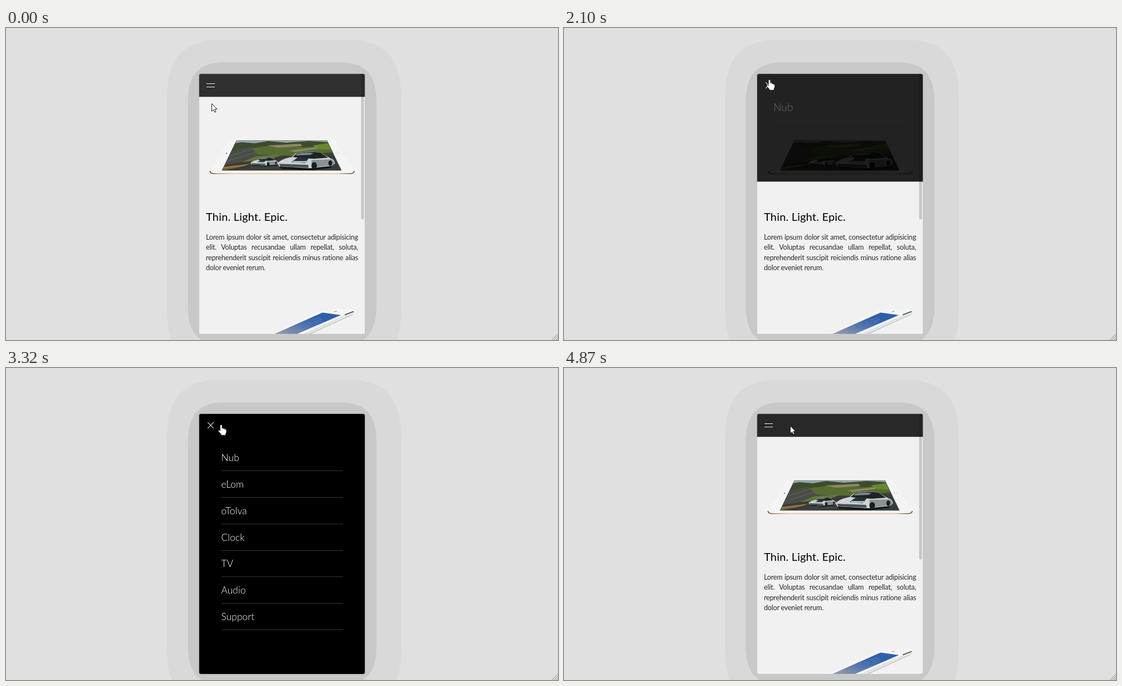
Write an HTML page that moves like this. It is 994 by 563 pixels and loops after 5.97 s.

```html
<!DOCTYPE html>
<html lang="en">
<head>
<meta charset="utf-8">
<title>Mobile menu</title>
<style>
html, body { margin: 0; width: 100%; height: 100%; overflow: hidden; background: #e0e0e0; }
body { position: relative; font: 12.6px Lato, "Open Sans", sans-serif; }
svg { position: absolute; left: 0; top: 0; }
h1, p { position: absolute; left: 360px; margin: 0; white-space: nowrap; }
h1 { top: 327px; font-size: 20px; font-weight: 400; line-height: 26px; letter-spacing: .2px; color: #000; }
p { width: 274px; line-height: 18.5px; letter-spacing: -.22px; color: #2a2a2a; text-align-last: justify; }
p:last-of-type { text-align-last: left; }
nav { position: absolute; left: 348px; top: 83px; width: 298px; overflow: hidden; border-radius: 3px 3px 0 0;
  box-shadow: 0 0 0 1px rgba(0,0,0,.2); }
nav div { position: absolute; left: 39.5px; width: 219px; height: 47px; line-height: 47px;
  font-size: 17.5px; font-weight: 300; color: #fff; border-bottom: 1px solid #363636; }
</style>
</head>
<body>
<svg width="994" height="563">
  <defs>
    <clipPath id="display"><path d="M415 203H578L604 257H389Z"/></clipPath>
    <clipPath id="page"><rect x="348" y="83" width="298" height="469" rx="3"/></clipPath>
    <linearGradient id="glow" x1="0" y1="1" x2="1" y2="0">
      <stop offset="0" stop-color="#a09fac"/><stop offset=".4" stop-color="#5577ad"/><stop offset=".7" stop-color="#2e60aa"/>
    </linearGradient>
    <linearGradient id="gold">
      <stop offset="0" stop-color="#4d3a2a"/><stop offset=".05" stop-color="#b08a5c"/><stop offset=".15" stop-color="#e0c49c"/>
      <stop offset=".88" stop-color="#dfc49f"/><stop offset="1" stop-color="#4d3a2a"/>
    </linearGradient>
    <g id="car">
      <path d="M2 26L100 24 98 30 60 35 8 32Z" fill="#131617"/>
      <path d="M1 22Q8 14 26 11L34 4Q54-1 78 3L96 13Q105 16 104 23L98 27 60 31 4 28Z" fill="#cfd3d4"/>
      <path d="M62 16L98 15Q104 18 103 23L98 26 62 30Z" fill="#8c9293"/>
      <path d="M28 11L36 4Q54 0 78 3L92 12 66 14 52 13Z" fill="#1d2326"/>
      <path d="M38 11L58 12 50 22 26 20Z" fill="#2a3033"/>
      <path d="M36 5Q50 1 66 4L60 7 34 8Z" fill="#788488"/>
      <path d="M4 23L56 25 57 30 6 28Z" fill="#4b5153"/>
      <path d="M29 18L55 18 54 21 28 22Z" fill="#a5bfcc"/>
      <ellipse cx="67" cy="26" rx="5" ry="6" fill="#1a1d1e"/>
      <ellipse cx="96" cy="22" rx="3.5" ry="5" fill="#1a1d1e"/>
    </g>
  </defs>
  <path id="halo" fill="#d9d9d9"/>
  <path id="bezel" fill="#c8c8c8"/>
  <g clip-path="url(#page)">
    <path d="M348 83H646V552H348Z" fill="#f1f1f1"/>
    <!-- tablet -->
    <path d="M406 200H587Q590 200 592 203L626 256Q629 261 624 263H371Q366 262 369 256L400 203Q402 200 406 200Z" fill="#f4f4f4"/>
    <path d="M367.5 258Q367 262.5 374 262.8H620Q627 262.5 627 258" fill="none" stroke="url(#gold)" stroke-width="1.5"/>
    <circle cx="397" cy="226" r="1" fill="#555"/>
    <ellipse cx="597" cy="225" rx="4" ry="1.5" fill="none" stroke="#e2e2e2"/>
    <g clip-path="url(#display)">
      <path d="M380 200H610V260H380Z" fill="#383c39"/>
      <path d="M400 203H590V210H400Z" fill="#93a9ae"/>
      <path d="M400 210L424 206 448 208 472 204 505 207 545 204 600 207V228H400Z" fill="#3d4b2c"/>
      <path d="M440 217L480 212 540 215 604 211V222L530 231 455 229Z" fill="#566c33"/>
      <path d="M470 212L530 209 534 213 490 216ZM510 221L560 215 562 218 520 224Z" fill="#8f8763"/>
      <path d="M552 212L584 207 592 219 566 219Z" fill="#66882f"/>
      <path d="M405 222L440 214 456 231 420 243 392 247Z" fill="#4a4d47"/>
      <path d="M400 232L446 217M396 241L452 224" stroke="#62675c"/>
      <path d="M424 242L452 231 500 228 476 237Z" fill="#64743c"/>
      <path d="M440 252L495 246M420 256L500 251" stroke="#4c504c"/>
      <path d="M388 251L440 245 430 249 388 256Z" fill="#a2713a"/>
      <path d="M388 254L430 249 412 253 386 258Z" fill="#63633a"/>
      <use href="#car" transform="translate(440 233) scale(.48)"/>
      <use href="#car" transform="translate(488 222)"/>
    </g>
    <path d="M415 203H578L604 257H389Z" fill="none" stroke="#444" stroke-width=".5"/>
    <!-- phone -->
    <path d="M470 555L566 510Q590 505 623 508 630 510 626 516L548 556Z" fill="#f5f5f5"/>
    <path d="M627 512Q628 516 622 519L546 554H532L612 518Z" fill="#cdd0d1"/>
    <path d="M626 514L537 554" stroke="#f2f2f2" stroke-width="1.5"/>
    <path d="M610 517.5L626 511.5" stroke="#3d4246" stroke-width="1.4"/>
    <path d="M481 553L570 513.5 603 518 522 553Z" fill="url(#glow)"/>
    <path d="M544 531l5 3M552 527l14-5M555 530l14-5M558 533l10-4" stroke="#6a8abd" stroke-width=".8"/>
    <path d="M590 512l6-1" stroke="#999"/>
    <rect x="639.5" y="78" width="5" height="267.5" rx="2.5" fill="#c6c6c6"/>
  </g>
  <path d="M983 563l11-11M987 563l7-7M991 563l3-3" stroke="#888"/>
</svg>

<h1>Thin. Light. Epic.</h1>
<p>Lorem ipsum dolor sit amet, consectetur adipisicing</p>
<p>elit. Voluptas recusandae ullam repellat, soluta,</p>
<p>reprehenderit suscipit reiciendis minus ratione alias</p>
<p>dolor eveniet rerum.</p>

<nav></nav>

<svg width="994" height="563">
  <rect class="bar" x="-7.5" y="-.5" width="15" height="1" fill="#f2f2f2"/>
  <rect class="bar" x="-7.5" y="-.5" width="15" height="1" fill="#f2f2f2"/>
  <g id="cursor" fill="#fff" stroke="#15152a" stroke-linejoin="round">
    <path id="arrow" d="M.5.5V14.2L3.6 11.4 5.8 16 8 15 5.9 10.4H10Z"/>
    <path id="hand" stroke-width=".6" d="M-1.7 1.5C-1.7-.6 1.7-.6 1.7 1.5V6.2Q4 5 4.5 7 6.5 6 7 8 9.5 7.5 9.5 10V13L8 16.5V18.5H0V17L-4.8 11.5Q-5.5 9-3.3 9.3L-1.7 11Z"/>
  </g>
</svg>

<script>
const LOOP = 5970;
const $ = s => document.querySelector(s);
const all = s => [...document.querySelectorAll(s)];
const seg = (t, a, b) => Math.min(1, Math.max(0, (t - a) / (b - a)));
const easeIn = u => u * u;
const easeOut = u => 1 - (1 - u) ** 2;
const smooth = u => u * u * (3 - 2 * u);

// Soft-cornered box: cw, ch are the corner extents
function softBox(l, t, r, b, cw, ch) {
  const k = .3, x = cw * k, y = ch * k;
  return `M${l} ${t + ch}C${l} ${t + y} ${l + x} ${t} ${l + cw} ${t}H${r - cw}` +
    `C${r - x} ${t} ${r} ${t + y} ${r} ${t + ch}V${b - ch}` +
    `C${r} ${b - y} ${r - x} ${b} ${r - cw} ${b}H${l + cw}` +
    `C${l + x} ${b} ${l} ${b - y} ${l} ${b - ch}Z`;
}
$('#halo').setAttribute('d', softBox(290, 21, 711.5, 614, 100, 105));
$('#bezel').setAttribute('d', softBox(327.5, 62, 667, 573, 66, 72));

all('p').forEach((p, i) => p.style.top = 368.75 + 18.5 * i + 'px');

const nav = $('nav');
const rows = ['Nub', 'eLom', 'oTolva', 'Clock', 'TV', 'Audio', 'Support'].map((name, i) => {
  const row = document.createElement('div');
  row.textContent = name;
  row.style.top = 55.25 + 47.8 * i + 'px';
  nav.append(row);
  return row;
});
const bars = all('.bar');

// Pointer stops: time, x, y
const path = [
  [0, 370, 136], [1010, 370, 136], [1390, 370, 93.5], [2720, 370, 93.5], [2860, 388, 103],
  [3270, 388, 103], [3600, 379, 98], [3910, 381, 104], [4580, 381, 104], [4870, 407, 104], [LOOP, 407, 104]
];
function pointerAt(t) {
  const i = path.findIndex(p => p[0] > t);
  const [t0, x0, y0] = path[i - 1], [t1, x1, y1] = path[i];
  const u = smooth(seg(t, t0, t1));
  return [x0 + (x1 - x0) * u, y0 + (y1 - y0) * u];
}

function draw(t) {
  const open = easeIn(seg(t, 1850, 2270)) - easeIn(seg(t, 4078, 4560));
  const alpha = .8 + .2 * seg(t, 1850, 2720) - .168 * seg(t, 4150, 4870);
  nav.style.height = 41 + 428 * open + 'px';
  nav.style.background = `rgba(0,0,0,${alpha})`;
  nav.style.borderRadius = open > .99 ? '3px' : '3px 3px 0 0';

  rows.forEach((row, i) => {
    const enter = 2041 + 70 * i, leave = 4533 - 46 * i;
    const e = easeOut(seg(t, enter, enter + 335)) - easeOut(seg(t, leave, leave + 335));
    row.style.opacity = e;
    row.style.transform = e < 1 ? `translateY(${-27 * (1 - e)}px) scale(${1 + .15 * (1 - e)})` : 'none';
  });

  const cross = smooth(seg(t, 1700, 2000)) - smooth(seg(t, 4080, 4380));
  bars.forEach((bar, i) => {
    const side = i ? 1 : -1;
    bar.setAttribute('transform',
      `translate(368.5 ${103.5 + 3 * side * (1 - cross)}) rotate(${-45 * side * cross})`);
  });

  const onButton = t > 1190 && t < 4720;
  $('#cursor').setAttribute('transform', `translate(${pointerAt(t)})`);
  $('#hand').style.display = onButton ? '' : 'none';
  $('#arrow').style.display = onButton ? 'none' : '';
}

const start = performance.now();
function tick() {
  draw((performance.now() - start) % LOOP);
  requestAnimationFrame(tick);
}
tick();
</script>
</body>
</html>
```
